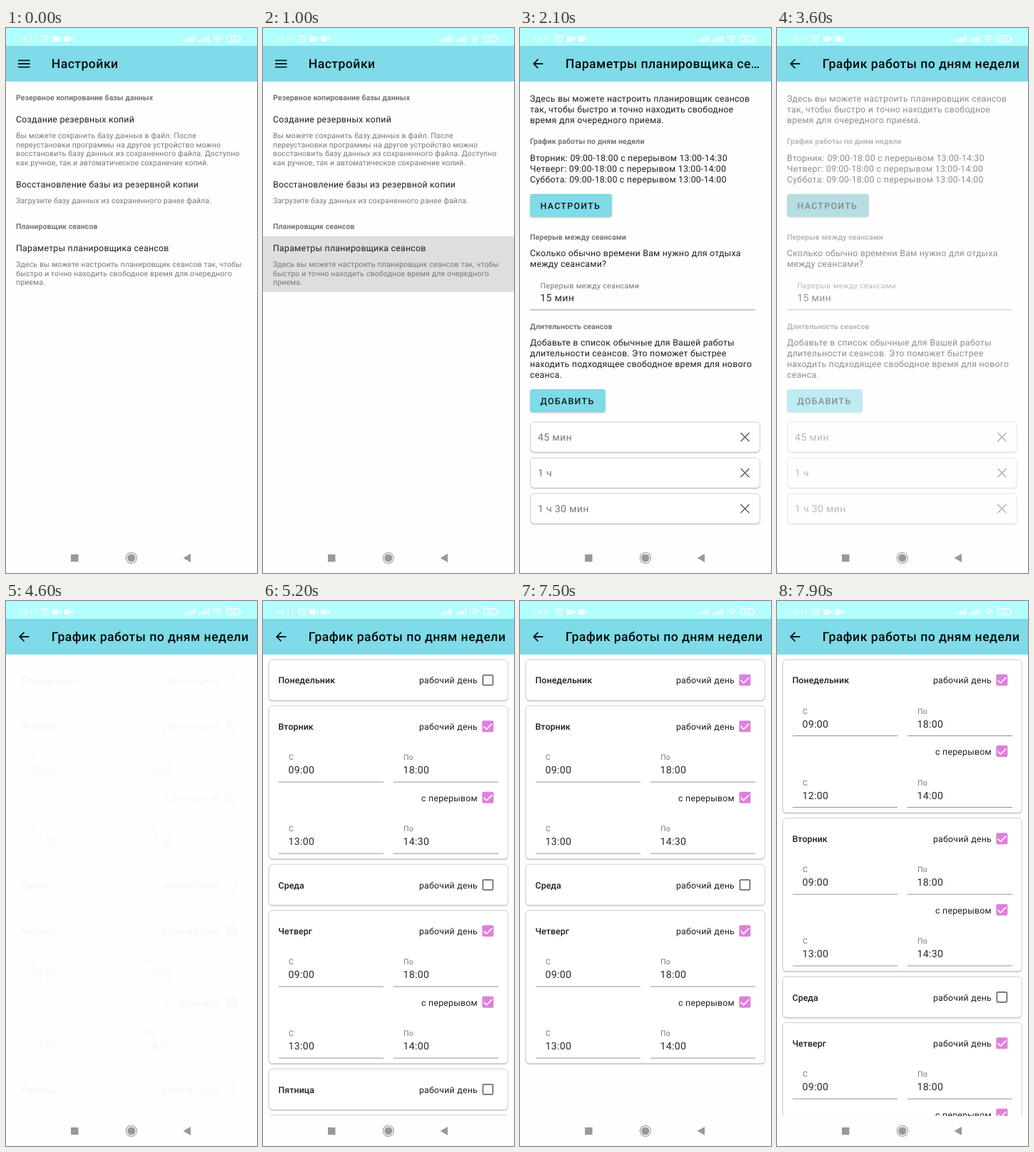
An HTML page for the animation above (8 s loop, 352x762 px).

```html
<!DOCTYPE html>
<html lang="ru">
<head>
<meta charset="utf-8">
<title>Настройки</title>
<style>
html, body { margin: 0; width: 100%; height: 100%; overflow: hidden; background: #fff; }
svg { display: block; width: 100vw; height: 100vh; }
text { font-family: Roboto, sans-serif; text-rendering: geometricPrecision; white-space: pre; }
.title { font-size: 17.6px; font-weight: 500; letter-spacing: .026em; fill: #050a0b; }
.body { font-size: 12.32px; letter-spacing: .02em; fill: #1f1f1f; }
.input { font-size: 14.08px; letter-spacing: .022em; fill: #2a2a2a; }
.chip { font-size: 14.08px; letter-spacing: .022em; fill: #777; }
.note { font-size: 10.56px; letter-spacing: .013em; fill: #777; }
.label { font-size: 10.56px; letter-spacing: .033em; fill: #737373; }
.head { font-size: 10.56px; font-weight: 700; letter-spacing: .006em; fill: #757575; }
.day { font-size: 12.32px; font-weight: 500; letter-spacing: .008em; fill: #1c1c1c; }
.button { font-size: 12.32px; font-weight: 500; letter-spacing: .11em; fill: #10191b; }
.clock { font-size: 10.5px; fill: #fff; }
.end { text-anchor: end; }
.card { fill: #fff; stroke: #d0d0d0; filter: drop-shadow(0 1px .6px #0003); }
.raised { fill: #7edbe7; filter: drop-shadow(0 1px 1px #0004); }
.line { stroke: #949494; }
.icon { fill: none; stroke: #10191b; stroke-width: 1.8; }
.cross { fill: none; stroke: #666; stroke-width: 1.6; }

.settings, .settings-bar, .params, .params-bar, .plan, .arrow, .ripple, .press, .cards,
.tail, .below, .closed, .opened, .off, .on { animation: 8s step-end infinite; }
.settings { animation-name: settings; }
.settings-bar { animation-name: settings-bar; }
.ripple { animation-name: ripple; transform-origin: 176px 330px; }
.arrow { animation-name: arrow; }
.params { animation-name: params; }
.params-bar { animation-name: params-bar; }
.press { animation-name: press; }
.plan { animation-name: plan; }
.cards { animation-name: cards; }
.tail { animation-name: tail; }
.below { animation-name: below; }
.closed { animation-name: closed; }
.opened { animation-name: opened; }
.off { animation-name: off; }
.on { animation-name: on; }

@keyframes settings {
  0% { opacity: 1; }
  12.5% { opacity: 1; animation-timing-function: steps(3); }
  16.25%, 100% { opacity: 0; }
}
@keyframes settings-bar { 0% { opacity: 1; } 13.75%, 100% { opacity: 0; } }
@keyframes ripple {
  0% { transform: scale(0); }
  7.5% { transform: scale(0); animation-timing-function: steps(4); }
  12.5%, 100% { transform: scale(1); }
}
@keyframes arrow { 0% { opacity: 0; } 13.75%, 100% { opacity: 1; } }
@keyframes params {
  0% { opacity: 0; }
  12.5% { opacity: 0; animation-timing-function: steps(3); }
  16.25% { opacity: 1; }
  43.75% { opacity: 1; animation-timing-function: steps(2); }
  46.25%, 100% { opacity: 0; }
}
@keyframes params-bar { 0% { opacity: 0; } 13.75% { opacity: 1; } 45%, 100% { opacity: 0; } }
@keyframes press { 0% { opacity: 0; } 43.75%, 100% { opacity: .14; } }
@keyframes plan { 0% { opacity: 0; } 45%, 100% { opacity: 1; } }
@keyframes cards {
  0% { opacity: 0; }
  57.5% { opacity: .04; animation-timing-function: steps(4); }
  62.5%, 100% { opacity: 1; }
}
@keyframes tail { 0% { opacity: 1; } 92.5% { opacity: .4; } 93.75%, 100% { opacity: 0; } }
@keyframes below {
  0% { transform: none; }
  95% { transform: translateY(30px); }
  96.25% { transform: translateY(105px); }
  97.5% { transform: translateY(152px); }
  98.75%, 100% { transform: translateY(157px); }
}
@keyframes closed { 0% { opacity: 1; } 95% { opacity: .7; } 96.25% { opacity: .3; } 97.5%, 100% { opacity: 0; } }
@keyframes opened { 0% { opacity: 0; } 95% { opacity: .3; } 96.25% { opacity: .7; } 97.5%, 100% { opacity: 1; } }
@keyframes off { 0% { opacity: 1; } 92.5%, 100% { opacity: 0; } }
@keyframes on { 0% { opacity: 0; } 92.5%, 100% { opacity: 1; } }
</style>
</head>
<body>
<svg id="stage" viewBox="0 0 352 762" preserveAspectRatio="none"></svg>
<script>
const text = (cls, x, y, s) => `<text class="${cls}" x="${x}" y="${y}">${s}</text>`;
const lines = (cls, y, step, rows) => rows.map((s, i) => text(cls, 14, y + i * step, s)).join('');
const group = (cls, ...parts) => `<g class="${cls}">${parts.join('')}</g>`;
const title = s => text('title', 63.7, 56.4, s);
const card = (x, y, w, h) => `<rect class="card" x="${x}" y="${y}" width="${w}" height="${h}" rx="5"/>`;
const rule = (x, y, w) => `<path class="line" d="M${x} ${y}h${w}"/>`;

const button = (y, w, s, extra = '') =>
  `<rect class="raised" x="14.2" y="${y}" width="${w}" height="32" rx="3.5"/>${extra}` + text('button', 28.5, y + 20.8, s);

const chip = (y, s) => card(14.5, y, 322, 42) + text('chip', 25, y + 26, s) +
  `<path class="cross" d="M309.5 ${y + 15}l12 12m0-12l-12 12"/>`;

const checkOff = y =>
  `<rect x="308.4" y="${y - 7.4}" width="14" height="14" rx="1.2" fill="none" stroke="#6f6f6f" stroke-width="1.8"/>`;
const checkOn = y =>
  `<rect x="307.4" y="${y - 8.4}" width="16" height="16" rx="2" fill="#e07fdc"/>
   <path d="M309.6 ${y - .2}l3.9 3.9 7.7-7.7" fill="none" stroke="#fff" stroke-width="1.6"/>`;

const field = (x, y, name, value) =>
  text('label', x + 14, y + 3.8, name) + text('input', x + 13.6, y + 22.6, value) + rule(x, y + 34.5, 147);
const span = (y, from, to) => field(22, y, 'С', from) + field(183, y, 'По', to);
const hours = (y, pause) => span(y + 72, '09:00', '18:00') +
  text('body end', 301, y + 133, 'с перерывом') + checkOn(y + 128.5) + span(y + 172, ...pause);

const dayLabel = (y, name) => text('day', 21.5, y + 33.4, name) + text('body end', 301, y + 33.4, 'рабочий день');
const dayCard = (y, name, pause) => card(8, y, 335.5, pause ? 214 : 57) + dayLabel(y, name) +
  (pause ? checkOn(y + 29) + hours(y, pause) : checkOff(y + 29));

const bars = x => [3, 4.5, 6, 7.5, 9].map((h, i) =>
  `<rect x="${x + i * 3.3}" y="${19.5 - h}" width="2" height="${h}"/>`).join('');
const camera = x => `<rect x="${x}" y="11.5" width="8" height="7.5" rx="1.5"/><path d="M${x + 8} 15l4-3v6.5z"/>`;

const chrome = `
  <rect width="352" height="762" fill="#fefefe"/>
  <rect y="74.5" width="352" height="1.2" fill="#e6f1f2"/>
  <rect y="24" width="352" height="50.7" fill="#7edbe7"/>
  <rect width="352" height="25" fill="#b2ffff"/>
  <g fill="#fff" opacity=".9">
    ${text('clock', 18, 19, '14:11')}
    <g fill="none" stroke="#fff" stroke-width="1.3">
      <circle cx="54.5" cy="15.5" r="4.3"/><path d="M54.5 13v3h2M49 12l3-2.5M60 12l-3-2.5"/>
      <path d="M290 13.5q6.5-5 13 0M292.5 16q4-3 8 0"/>
      <rect x="309.5" y="10.5" width="18" height="9" rx="3"/>
    </g>
    <path d="M294 16.5h5l-2.5 3z"/><rect x="328.3" y="13" width="1.5" height="4"/>
    <text x="314" y="18" font-size="8" font-weight="500">62</text>
    ${camera(65.5)}${camera(81.5)}${bars(250)}${bars(270)}
  </g>
  <g fill="#999">
    <rect x="91" y="736" width="10.5" height="10.3"/>
    <circle cx="175.8" cy="741" r="5.6"/>
    <circle cx="175.8" cy="741" r="7.5" fill="none" stroke="#999" stroke-width="1.1"/>
    <path d="M248.5 741l10.5-6v12z"/>
  </g>`;

const bars3 = '<path class="icon" d="M17 45.3h16.5M17 50h16.5M17 54.7h16.5"/>';
const header =
  group('settings-bar', bars3, title('Настройки')) +
  group('params-bar', title('Параметры планировщика се…')) +
  group('plan', title('График работы по дням недели')) +
  '<path class="icon arrow" d="M32.3 50H19.5M25.5 43.7L19.2 50l6.3 6.3"/>';

const settings = group('settings',
  '<g clip-path="url(#row)"><circle class="ripple" cx="176" cy="330" r="182" fill="#dedede"/></g>',
  text('head', 14, 101, 'Резервное копирование базы данных'),
  text('body', 14, 131.8, 'Создание резервных копий'),
  lines('note', 153.8, 12.7, [
    'Вы можете сохранить базу данных в файл. После',
    'переустановки программы на другое устройство можно',
    'восстановить базу данных из сохраненного файла. Доступно',
    'как ручное, так и автоматическое сохранение копий.']),
  text('body', 14, 222.7, 'Восстановление базы из резервной копии'),
  text('note', 14, 245, 'Загрузите базу данных из сохраненного ранее файла.'),
  text('head', 14, 280.8, 'Планировщик сеансов'),
  text('body', 14, 311.8, 'Параметры планировщика сеансов'),
  lines('note', 333.9, 12.7, [
    'Здесь вы можете настроить планировщик сеансов так, чтобы',
    'быстро и точно находить свободное время для очередного',
    'приема.']));

const params = group('params',
  lines('body', 103.3, 14.9, [
    'Здесь вы можете настроить планировщик сеансов',
    'так, чтобы быстро и точно находить свободное',
    'время для очередного приема.']),
  text('head', 14, 162.3, 'График работы по дням недели'),
  lines('body', 186.3, 14.9, [
    'Вторник: 09:00-18:00 с перерывом 13:00-14:30',
    'Четверг: 09:00-18:00 с перерывом 13:00-14:00',
    'Суббота: 09:00-18:00 с перерывом 13:00-14:00']),
  button(232, 114.5, 'НАСТРОИТЬ', '<rect class="press" x="14.2" y="232" width="114.5" height="32" rx="3.5"/>'),
  text('head', 14, 295.5, 'Перерыв между сеансами'),
  lines('body', 318.7, 14.9, ['Сколько обычно времени Вам нужно для отдыха', 'между сеансами?']),
  text('label', 28.5, 363.7, 'Перерыв между сеансами'),
  text('input', 28.3, 382, '15 мин'),
  rule(14, 394, 316),
  text('head', 14, 420.5, 'Длительность сеансов'),
  lines('body', 444.4, 14.9, [
    'Добавьте в список обычные для Вашей работы',
    'длительности сеансов. Это поможет быстрее',
    'находить подходящее свободное время для нового',
    'сеанса.']),
  button(505, 105.5, 'ДОБАВИТЬ'),
  chip(551, '45 мин'), chip(601, '1 ч'), chip(651, '1 ч 30 мин'));

const monday = group('closed', card(8, 82, 335.5, 57)) +
  group('opened', card(8, 82, 335.5, 214), hours(82, ['12:00', '14:00'])) +
  dayLabel(82, 'Понедельник') + group('off', checkOff(111)) + group('on', checkOn(111));

const plan = '<g clip-path="url(#list)">' +
  group('cards',
    monday,
    group('tail', dayCard(654.2, 'Пятница'), dayCard(718.7, 'Суббота')),
    group('below',
      dayCard(146.6, 'Вторник', ['13:00', '14:30']),
      dayCard(368.2, 'Среда'),
      dayCard(432.6, 'Четверг', ['13:00', '14:00']))) +
  '</g>';

document.getElementById('stage').innerHTML = `
  <clipPath id="row"><rect y="291" width="352" height="78"/></clipPath>
  <clipPath id="list"><rect y="75" width="352" height="645"/></clipPath>
  ${chrome}${header}${settings}${params}${plan}`;
</script>
</body>
</html>
```
